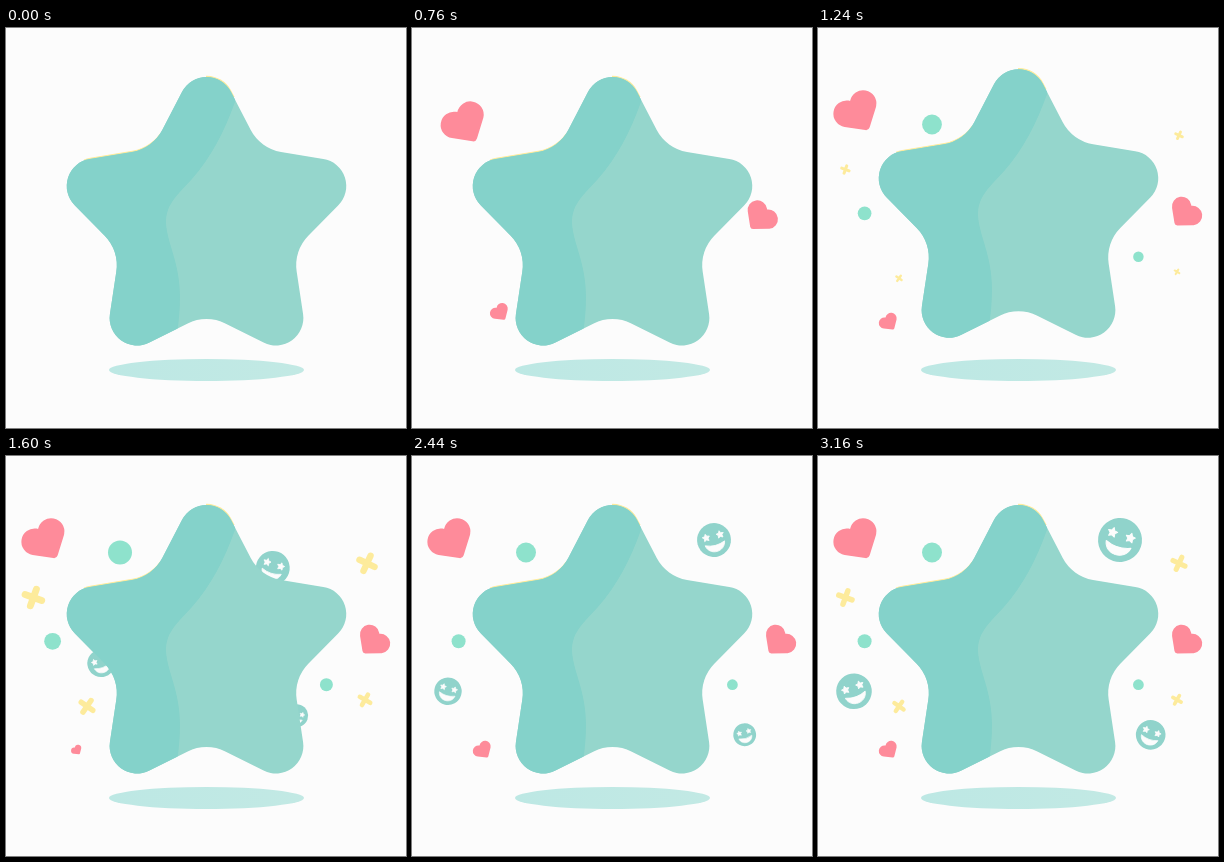
Animation of 400x400 px, one loop 4000 ms. Source, as an HTML page with a canvas:

```html
<!DOCTYPE html>
<html lang="en">
<head>
<meta charset="utf-8">
<title>Star</title>
<style>
  html, body { margin: 0; width: 100%; height: 100%; overflow: hidden; background: #fcfcfc; }
  canvas { display: block; width: 400px; height: 400px; }
</style>
</head>
<body>
<canvas id="stage" width="400" height="400"></canvas>
<script>
const ctx = document.getElementById('stage').getContext('2d');
const LOOP = 4000, STEP = 40, REST = 280, END = 3160;
const RAD = Math.PI / 180;
const CX = 200.5, CY = 194.5;

const PINK = '#fe8b9a', MINT = '#8ee2cc', YELLOW = '#fdeb9c';
const TEAL = '#95d6cc', DARK = '#84d2ca', FACE = '#90d3cb', PAPER = '#fcfcfc';

// x, y: resting centre; dx, dy: way back to the hiding place
const hearts = [
  { x: 39, y: 84, dx: 77, dy: 65, size: 1, tilt: -32, pulse: 1880 },
  { x: 367.2, y: 185.2, dx: -106, dy: 21, size: 0.73, tilt: 40, pulse: 1600 },
  { x: 70.7, y: 294.1, dx: 99, dy: -57, size: 0.42, tilt: -35, pulse: 1320 }
];
const faces = [
  { x: 302, y: 84, dx: -68, dy: 54, r: 22, tilt: 18 },
  { x: 36, y: 235.3, dx: 114, dy: -54, r: 17.8, tilt: -20 },
  { x: 332.7, y: 278.8, dx: -81, dy: -37, r: 14.8, tilt: 20 }
];
const dots = [
  { x: 114, y: 96.5, r: 10, wait: 0 },
  { x: 46.6, y: 185.3, r: 7, wait: 12 },
  { x: 320.4, y: 228.7, r: 5.4, wait: 20 }
];
const crosses = [
  { x: 27.4, y: 141.5, r: 9.8, tilt: 20 },
  { x: 361, y: 107.3, r: 9.2, tilt: 25 },
  { x: 81, y: 250.3, r: 7.8, tilt: 35 },
  { x: 359, y: 243.8, r: 6.6, tilt: 30 }
];

const ramp = (t, a, b) => Math.min(1, Math.max(0, (t - a) / (b - a)));
const smooth = u => (1 - Math.cos(Math.PI * u)) / 2;
const easeOut = u => Math.sin(Math.PI * u / 2);
const ease = (t, a, b) => smooth(ramp(t, a, b));
const hump = (t, a, b) => Math.sin(Math.PI * ramp(t, a, b)) ** 2;

// Grow past full size, then settle at 1
function pop(t, start, peak, end, over) {
  return over * easeOut(ramp(t, start, peak)) - (over - 1) * ease(t, peak, end);
}

function at(x, y, tilt, scale, draw) {
  if (scale <= 0.001) return;
  ctx.save();
  ctx.translate(x, y);
  ctx.rotate(tilt * RAD);
  ctx.scale(scale, scale);
  draw();
  ctx.restore();
}

function makeStar() {
  const path = new Path2D();
  const pts = [];
  for (let i = 0; i < 10; i++) {
    const a = (i * 36 - 90) * RAD, outer = i % 2 === 0, d = outer ? 177.8 : 91.5;
    pts.push({ x: CX + d * Math.cos(a), y: CY + d * Math.sin(a), r: outer ? 27.5 : 42 });
  }
  path.moveTo((pts[9].x + pts[0].x) / 2, (pts[9].y + pts[0].y) / 2);
  pts.forEach((p, i) => {
    const q = pts[(i + 1) % 10];
    path.arcTo(p.x, p.y, q.x, q.y, p.r);
  });
  path.closePath();
  return path;
}

function makeHeart() {
  const path = new Path2D(), y = -4, gap = 9.7, r = 13.3, tip = 22;
  const notch = Math.acos(gap / r);
  const dist = Math.hypot(gap, tip - y);
  const side = Math.atan2(tip - y, -gap) - Math.acos(r / dist);
  path.arc(gap, y, r, notch - Math.PI, side);
  path.arcTo(0, tip, -gap - r * Math.cos(side), y + r * Math.sin(side), 4);
  path.arc(-gap, y, r, Math.PI - side, -notch);
  path.closePath();
  return path;
}

const star = makeStar();
const heart = makeHeart();

function disc(x, y, r, color) {
  ctx.fillStyle = color;
  ctx.beginPath();
  ctx.arc(x, y, r, 0, 2 * Math.PI);
  ctx.fill();
}

function drawEye(x, y) {
  ctx.beginPath();
  for (let i = 0; i < 10; i++) {
    const a = (i * 36 - 90) * RAD, r = i % 2 ? 2.6 : 5;
    ctx.lineTo(x + r * Math.cos(a), y + r * Math.sin(a));
  }
  ctx.closePath();
  ctx.fill();
  ctx.stroke();
}

function drawFace() {
  disc(0, 0, 22, FACE);
  ctx.fillStyle = ctx.strokeStyle = PAPER;
  ctx.lineWidth = 1;
  ctx.lineJoin = 'round';
  drawEye(-9.3, -5);
  drawEye(9.3, -5);
  ctx.beginPath();
  ctx.moveTo(-13, 4.5);
  ctx.quadraticCurveTo(0, 10, 13, 4.5);
  ctx.bezierCurveTo(10.5, 19, -10.5, 19, -13, 4.5);
  ctx.fill();
  ctx.stroke();
}

function drawCross(r) {
  const w = r * 0.56, arm = r - w / 2;
  ctx.strokeStyle = YELLOW;
  ctx.lineWidth = w;
  ctx.lineCap = 'round';
  ctx.beginPath();
  ctx.moveTo(-arm, 0);
  ctx.lineTo(arm, 0);
  ctx.moveTo(0, -arm);
  ctx.lineTo(0, arm);
  ctx.stroke();
}

function drawStar(lift) {
  ctx.save();
  ctx.translate(0, -lift);

  // thin glint on two upper edges
  ctx.save();
  ctx.beginPath();
  ctx.rect(200, 40, 29, 29);
  ctx.rect(78, 100, 76, 36);
  ctx.clip();
  ctx.translate(0.4, -1.1);
  ctx.fillStyle = YELLOW;
  ctx.fill(star);
  ctx.restore();

  ctx.fillStyle = TEAL;
  ctx.fill(star);
  ctx.clip(star);
  ctx.fillStyle = DARK;
  ctx.beginPath();
  ctx.moveTo(233, 40);
  ctx.lineTo(229, 74);
  ctx.bezierCurveTo(219, 102, 205, 130, 186, 151);
  ctx.bezierCurveTo(168, 170, 160, 178, 160, 195);
  ctx.bezierCurveTo(161, 215, 174, 235, 174, 268);
  ctx.quadraticCurveTo(174, 288, 171, 305);
  ctx.lineTo(160, 330);
  ctx.lineTo(40, 330);
  ctx.lineTo(40, 40);
  ctx.fill();
  ctx.restore();
}

function drawShadow() {
  const g = ctx.createLinearGradient(103, 0, 298, 0);
  g.addColorStop(0, '#bde8e4');
  g.addColorStop(1, '#c2e9e4');
  ctx.fillStyle = g;
  ctx.beginPath();
  ctx.ellipse(200.5, 342, 97.5, 11, 0, 0, 2 * Math.PI);
  ctx.fill();
}

function render(t) {
  ctx.fillStyle = PAPER;
  ctx.fillRect(0, 0, 400, 400);
  drawShadow();

  const heartBack = 1 - ease(t, 120, 1000);
  for (const h of hearts) {
    const scale = h.size * (1 - 0.43 * hump(t, h.pulse, h.pulse + 560));
    at(h.x + h.dx * heartBack, h.y + h.dy * heartBack, h.tilt, scale, () => {
      ctx.fillStyle = PINK;
      ctx.fill(heart);
    });
  }

  for (const d of dots) {
    const scale = pop(t, 880 + d.wait, 1500, 1840, 1.25);
    if (scale > 0) disc(d.x, d.y, d.r * scale, MINT);
  }

  const blink = 1 - ease(t, 1960, 2400) + ease(t, 2500, 3040);
  const crossScale = pop(t, 1120, 1540, 1840, 1.28) * blink;
  for (const c of crosses) at(c.x, c.y, c.tilt, crossScale, () => drawCross(c.r));

  const faceBack = 1 - ease(t, 1170, 2050);
  const swing = 1 - 1.8 * ease(t, 1940, 2440) + 1.8 * ease(t, 2500, 3120);
  const grow = 0.77 + 0.23 * ease(t, 2480, 3160);
  for (const f of faces) {
    at(f.x + f.dx * faceBack, f.y + f.dy * faceBack, f.tilt * swing, f.r / 22 * grow, drawFace);
  }

  drawStar(13 * hump(t, 780, 1420));
}

const begin = performance.now();
function tick() {
  const t = Math.floor(((performance.now() - begin) % LOOP) / STEP) * STEP;
  render(t < REST ? 0 : Math.min(t, END));
  requestAnimationFrame(tick);
}
tick();
</script>
</body>
</html>
```
